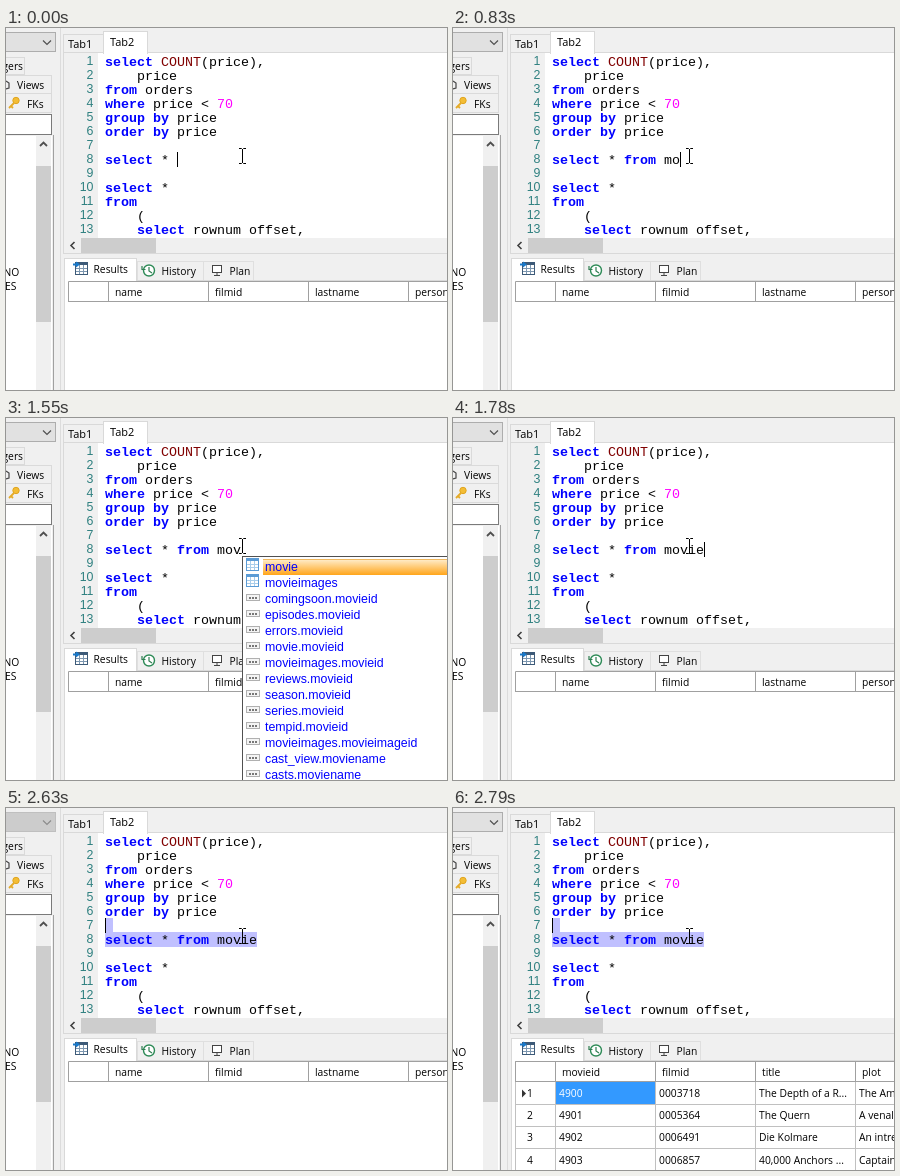
An HTML page that plays this animation: 441 px wide and 362 px high, repeating every 2.86 s.

```html
<!DOCTYPE html>
<html lang="en">
<head>
<meta charset="utf-8">
<title>Query editor</title>
<style>
  html, body { margin: 0; width: 100%; height: 100%; overflow: hidden; background: #f0f0f0; }
  svg { display: block; width: 441px; height: 362px; }
  text { font-family: "Open Sans", "Noto Sans", sans-serif; font-size: 10.3px; white-space: pre; }
  .code { font-family: "Liberation Mono", "Courier New", monospace; font-size: 13.333px; }
  .key { fill: #00f; font-weight: bold; }
  .func { fill: #800000; }
  .num { fill: #f0f; }
  .line-no, .item { font-family: "Liberation Sans", Arial, sans-serif; }
  .line-no { font-size: 12.4px; fill: #2f8080; text-anchor: end; }
  .tab { font-size: 11px; }
  .item { font-size: 12.35px; fill: #00f; }
</style>
</head>
<body>
<svg id="stage" viewBox="0 0 441 362" xmlns="http://www.w3.org/2000/svg">
  <defs>
    <linearGradient id="pick" x2="0" y2="1">
      <stop offset="0" stop-color="#ffefd0"/>
      <stop offset="1" stop-color="#ffa51a"/>
    </linearGradient>
  </defs>
</svg>
<script>
const stage = document.getElementById("stage");
const LOOP = 2860, LEFT = 99, CHAR = 8, TOP = 26, LINE = 14;

const rect = (x, y, w, h, fill, extra = "") =>
  `<rect x="${x}" y="${y}" width="${w}" height="${h}" fill="${fill}" ${extra}/>`;
const box = (x, y, w, h, fill, stroke) =>
  rect(x + .5, y + .5, w - 1, h - 1, fill, `stroke="${stroke}"`);
const path = (d, stroke, width = 1, fill = "none") =>
  `<path d="${d}" fill="${fill}" stroke="${stroke}" stroke-width="${width}"/>`;
const escape = s => s.replace(/</g, "&lt;");
const label = (x, y, s, cls = "", extra = "") =>
  `<text x="${x}" y="${y}" class="${cls}" ${extra}>${escape(s)}</text>`;

function add(markup, parent = stage) {
  const g = document.createElementNS(stage.namespaceURI, "g");
  g.innerHTML = markup;
  parent.append(g);
  return g;
}

const show = (el, on) => el.setAttribute("visibility", on ? "visible" : "hidden");

const colour = s => escape(s)
  .replace(/\b(select|from|where|group|order|by)\b|\b(COUNT)\b|\b(\d+)\b/g,
    (m, key, func) => `<tspan class="${key ? "key" : func ? "func" : "num"}">${m}</tspan>`);
const lineTop = n => TOP + LINE * (n - 1);
const codeLine = (n, s) => {
  const indent = s.length - s.trimStart().length;
  return `<text class="code" x="${LEFT + indent * CHAR}" y="${lineTop(n) + 12}">${colour(s.trimStart())}</text>`;
};

const tableIcon = (x, y, frame, grid) =>
  box(x, y, 13, 13, "#fff", frame) + rect(x + 1, y + 1, 11, 2, frame) +
  path(`M${x + 4.5} ${y + 3}v9M${x + 8.5} ${y + 3}v9` +
    `M${x + 1} ${y + 6.5}h11M${x + 1} ${y + 9.5}h11`, grid);

function sidePanel() {
  return box(-2, 29, 21, 18, "#f0f0f0", "#dadada") +
    box(-2, 47, 48, 19, "#f0f0f0", "#dadada") +
    box(-2, 65, 48, 20, "#f0f0f0", "#dadada") +
    label(17, 42, "Triggers", "", 'text-anchor="end"') +
    path("M0 53l3 2v5l-3 1", "#444", 1.2) +
    label(11, 61, "Views") +
    `<circle cx="10" cy="72.5" r="3.2" fill="#f3bd35" stroke="#e0a520"/>` +
    path("M8 75l-5 5M5 78l2 2", "#e5ab28", 1.8) +
    label(21, 80, "FKs") +
    box(-2, 86, 48, 21, "#fff", "#7a7a7a") +
    rect(0, 108, 46, 254, "#fff") +
    rect(30, 108, 15, 254, "#f0f0f0") +
    rect(30, 138, 15, 156, "#cdcdcd") +
    path("M34 118l3.5-3.5l3.5 3.5", "#505050", 1.8) +
    path("M47.5 107V362", "#a0a0a0") +
    label(-2.5, 248, "NO") + label(-1, 262, "ES");
}

function editor() {
  const lines = ["select COUNT(price),", "    price", "from orders", "where price < 70",
    "group by price", "order by price", "", "", "", "select *", "from", "    (",
    "    select rownum offset,"];
  return path("M54.5 0V362", "#dcdcdc") +
    box(57, 6, 41, 20, "#f0f0f0", "#d9d9d9") +
    rect(58, 24, 383, 186, "#fff") +
    path("M57.5 226V24.5H441", "#d9d9d9") +
    box(97, 3, 45, 23, "#fff", "#d9d9d9") + rect(98, 23, 43, 4, "#fff") +
    label(62, 20, "Tab1", "tab") + label(104, 18, "Tab2", "tab") +
    rect(58, 25, 34, 185, "#f0f0f0") +
    lines.map((s, i) => label(87.5, lineTop(i + 1) + 11, String(i + 1), "line-no") +
      (s ? codeLine(i + 1, s) : "")).join("") +
    rect(58, 210, 383, 15, "#f0f0f0") + rect(75, 210, 75, 15, "#cdcdcd") +
    path("M68.5 214l-3.5 3.5l3.5 3.5", "#404040", 1.6) +
    path("M57 225.5H441", "#d9d9d9");
}

function resultTabs() {
  return box(131, 233, 67, 20, "#f0f0f0", "#dfdfdf") +
    box(197, 233, 51, 20, "#f0f0f0", "#dfdfdf") +
    rect(58, 252, 383, 110, "#fff") +
    path("M58.5 362V252.5H441", "#d9d9d9") +
    box(58, 230, 73, 23, "#fff", "#d9d9d9") + rect(59, 250, 71, 4, "#fff") +
    tableIcon(69, 234, "#3d5a78", "#7d97b0") +
    path("M67 236.5h4", "#1979ca", 2) + path("M70 233.5l4 3l-4 3z", "none", 0, "#1979ca") +
    `<circle cx="143" cy="242.5" r="5.5" fill="#fff" stroke="#2e8b57" stroke-width="1.4"/>` +
    path("M143 239v4l3 2M136 238v3.5h3.5", "#2e7d50", 1.2) +
    box(206, 237, 10, 8, "#fff", "#444") + path("M211 245v2M208 247.5h6", "#444") +
    label(87.5, 245, "Results") + label(155.5, 247, "History") + label(223.5, 247, "Plan");
}

const columns = [102, 202, 302, 402];
const header = names =>
  rect(62, 254, 379, 19, "#fff") +
  path("M62.5 274V253.5H441M62 273.5H441", "#a0a0a0") +
  columns.map((x, i) => path(`M${x + .5} 254v19`, "#a0a0a0") + label(x + 7, 268, names[i])).join("");

function results() {
  const rows = [
    ["4900", "0003718", "The Depth of a R...", "The Am"],
    ["4901", "0005364", "The Quern", "A venal"],
    ["4902", "0006491", "Die Kolmare", "An intre"],
    ["4903", "0006857", "40,000 Anchors ...", "Captain"]
  ];
  return header(["movieid", "filmid", "title", "plot"]) +
    [62, ...columns].map(x => path(`M${x + .5} 274V362`, "#c0c0c0")).join("") +
    rect(103, 274, 99, 22, "#3399ff") +
    path("M69 281.5v8l4-4z", "none", 0, "#333") +
    rows.map((row, i) => {
      const y = 274 + Math.round(i * 22.2);
      return path(`M62 ${y + 22.5}H441`, "#c0c0c0") + label(74, y + 15, String(i + 1)) +
        row.map((s, c) => label(columns[c] + 4, y + 15, s, "", i + c ? "" : 'fill="#fff"')).join("");
    }).join("");
}

function popup() {
  const items = ["movie", "movieimages", "comingsoon.movieid", "episodes.movieid",
    "errors.movieid", "movie.movieid", "movieimages.movieid", "reviews.movieid",
    "season.movieid", "series.movieid", "tempid.movieid", "movieimages.movieimageid",
    "cast_view.moviename", "casts.moviename"];
  const columnIcon = y => box(240, y - 5, 14, 7, "#f4f4f4", "#b0b0b0") +
    [243, 246, 249].map(x => rect(x, y - 2, 2, 2, "#777")).join("");
  return box(236, 138, 210, 230, "#fff", "#505050") +
    rect(257, 141, 184, 16, "url(#pick)") + path("M257 141.5H441", "#f0b860") +
    items.map((s, i) => {
      const y = 149 + 16 * i;
      return (i < 2 ? tableIcon(240, y - 9, "#5b9bd5", "#a9cdea") : columnIcon(y)) +
        label(259, y + 4, s, "item");
    }).join("");
}

add(rect(0, 0, 441, 362, "#f0f0f0"));
const combo = add("");
add(sidePanel());
add(editor());
add(resultTabs());
add(header(["name", "filmid", "lastname", "personid"]));
const grid = add(results());
const selection = add(rect(LEFT, lineTop(7), 8, LINE, "#c0c0ff") +
  rect(LEFT, lineTop(8), 152, 15, "#c0c0ff"));
const query = add("");
const list = add(popup());
const caret = add(rect(0, 0, 1, 15, "#000"));
add(path("M233 120.5h2.5l1 1l1-1h2.5M236.5 121v14M233 135.5h2.5l1-1l1 1h2.5", "#000"));

const typing = [[0, ""], [130, "f"], [300, "fr"], [375, "fro"], [450, "from"],
  [600, "from "], [830, "from mo"], [1000, "from mov"], [1780, "from movie"]];

function draw(t) {
  const within = (a, b) => t >= a && t < b;
  const text = "select * " + typing.findLast(([at]) => t >= at)[1];
  const selected = t >= 2010;
  const busy = within(2480, 2790);

  query.innerHTML = codeLine(8, text);
  show(selection, selected);
  show(list, within(1000, 1780));
  show(grid, t >= 2710);
  show(caret, !within(1550, 1780));
  caret.setAttribute("transform", selected
    ? `translate(${LEFT} ${lineTop(7)})`
    : `translate(${LEFT + text.length * CHAR} ${lineTop(8)})`);
  combo.innerHTML = box(-2, 4, 52, 20, busy ? "#cccccc" : "#e1e1e1", busy ? "#bfbfbf" : "#adadad") +
    path("M37 12.5l4 4l4-4", busy ? "#8c8c8c" : "#505050", 1.2);
}

const start = performance.now();
function tick() {
  draw((performance.now() - start) % LOOP);
  requestAnimationFrame(tick);
}
tick();
</script>
</body>
</html>
```
